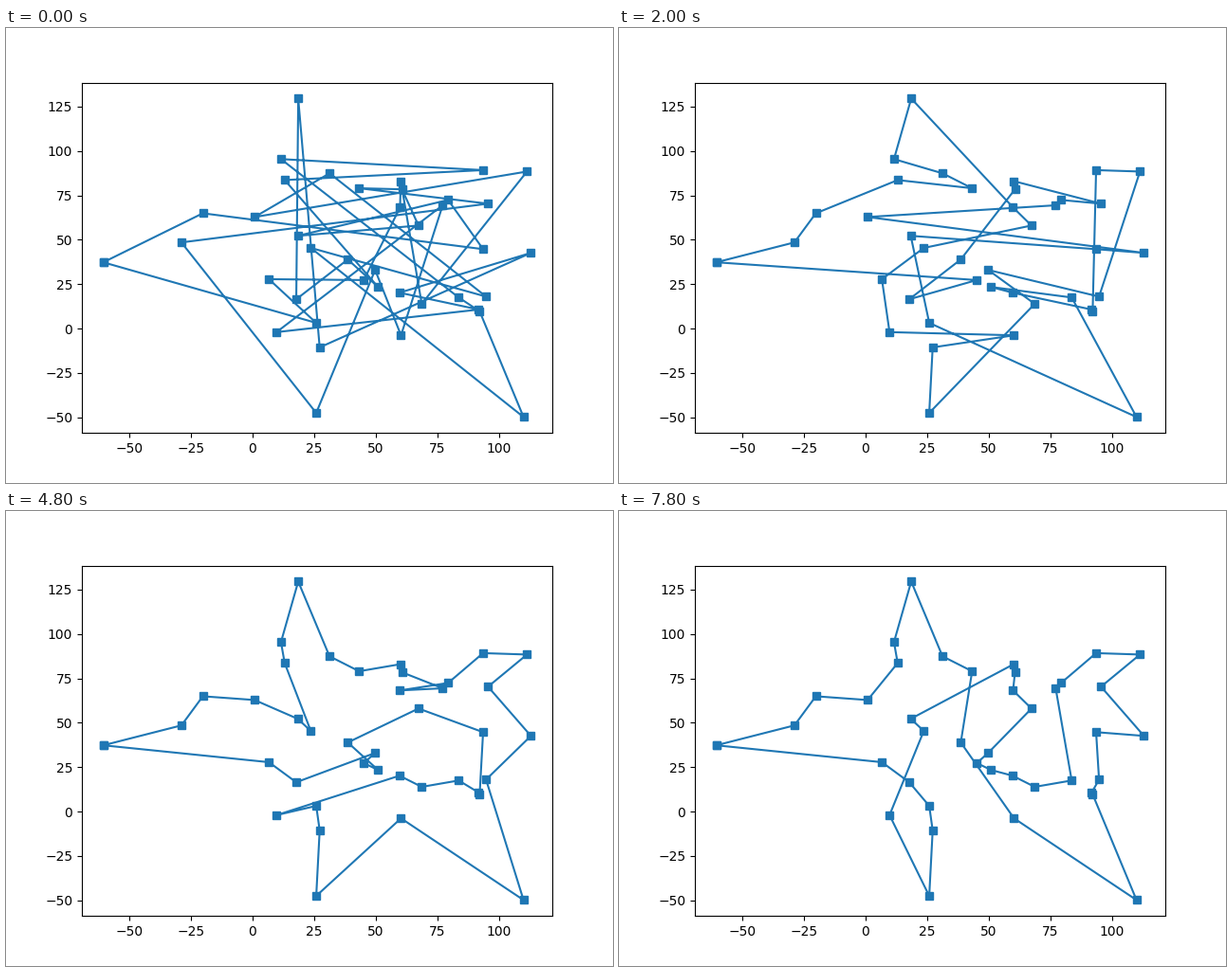
A matplotlib script that plays this animation: 640x480 px, repeating every 8 s.

```python
import matplotlib.pyplot as plt
import numpy as np
from matplotlib.animation import FuncAnimation

STEP_MS = 200
FRAMES = 40

CITIES = dict(
    A=(-60.5, 37.3), B=(-28.8, 48.5), C=(-20.1, 64.9), D=(0.9, 62.8),
    E=(18.4, 52.2), F=(23.7, 45.4), G=(6.7, 27.8), H=(17.8, 16.5),
    I=(25.9, 3.2), J=(9.8, -2.0), K=(27.3, -10.6), L=(25.9, -47.5),
    M=(110.0, -49.8), N=(60.3, -3.8), O=(92.2, 9.7), P=(91.8, 10.7),
    Q=(83.7, 17.5), R=(68.7, 13.9), S=(59.7, 20.2), T=(51.0, 23.4),
    U=(45.2, 27.3), V=(49.8, 33.0), W=(38.7, 38.9), X=(67.4, 58.0),
    Y=(59.9, 68.2), Z=(60.7, 78.4), a=(60.2, 83.0), b=(43.3, 79.0),
    c=(31.3, 87.4), d=(18.6, 129.5), e=(11.6, 95.4), f=(13.1, 83.6),
    g=(77.2, 69.4), h=(79.4, 72.4), i=(93.6, 89.2), j=(111.4, 88.4),
    k=(95.6, 70.3), l=(113.0, 42.6), m=(93.6, 44.7), n=(94.8, 18.0),
)

# Closed tours as visiting orders, keyed by the step at which they are reached.
TOURS = {
    0: "ACmhEXZbkBLVNgJPSlKdHWTfieQOMFncDjRaYUGI",
    6: "ABGPOnmljibghYZaFRQMLIKJedcfDCEVTSNkXWHU",
    14: "ABCfbcedYXFGJNKLRVnjikmghaZTUlOMPQSWIHED",
    19: "ABFHGWdefcaZbYhijlnmkgXSNIJKLMOPQRTUVEDC",
    24: "ABCDEFfedcbaZgYhijklnMNLKIJSRQPOmXWTUVHG",
    33: "ABCDEFfedcRQmlnOPkjihgMLKNSTVXZabYWUIJHG",
    39: "ABCDfedcbWNMOPnmlkjihgQRSTUVXYZaEFJLKIHG",
}


def reversals(start, goal):
    """All tours passed when segment reversals turn start into goal."""
    states = [start]
    for i, city in enumerate(goal):
        tour = states[-1]
        j = tour.index(city)
        if j != i:
            states.append(tour[:i] + tour[i:j + 1][::-1] + tour[j + 1:])
    return states


def build_sequence():
    keys = sorted(TOURS)
    sequence = [TOURS[0]]
    for lo, hi in zip(keys, keys[1:]):
        states = reversals(TOURS[lo], TOURS[hi])
        picks = np.linspace(0, len(states) - 1, hi - lo + 1).round().astype(int)
        sequence += [states[p] for p in picks[1:]]
    return sequence


def tour_xy(tour):
    return np.array([CITIES[c] for c in tour + tour[0]]).T


sequence = build_sequence()

fig, ax = plt.subplots(figsize=(6.4, 4.8), dpi=100)
line, = ax.plot(*tour_xy(sequence[0]), "s-", color="C0")


def update(frame):
    line.set_data(*tour_xy(sequence[frame]))
    return line,


anim = FuncAnimation(fig, update, frames=FRAMES, interval=STEP_MS,
                     repeat=True, repeat_delay=0)
plt.show()
```
